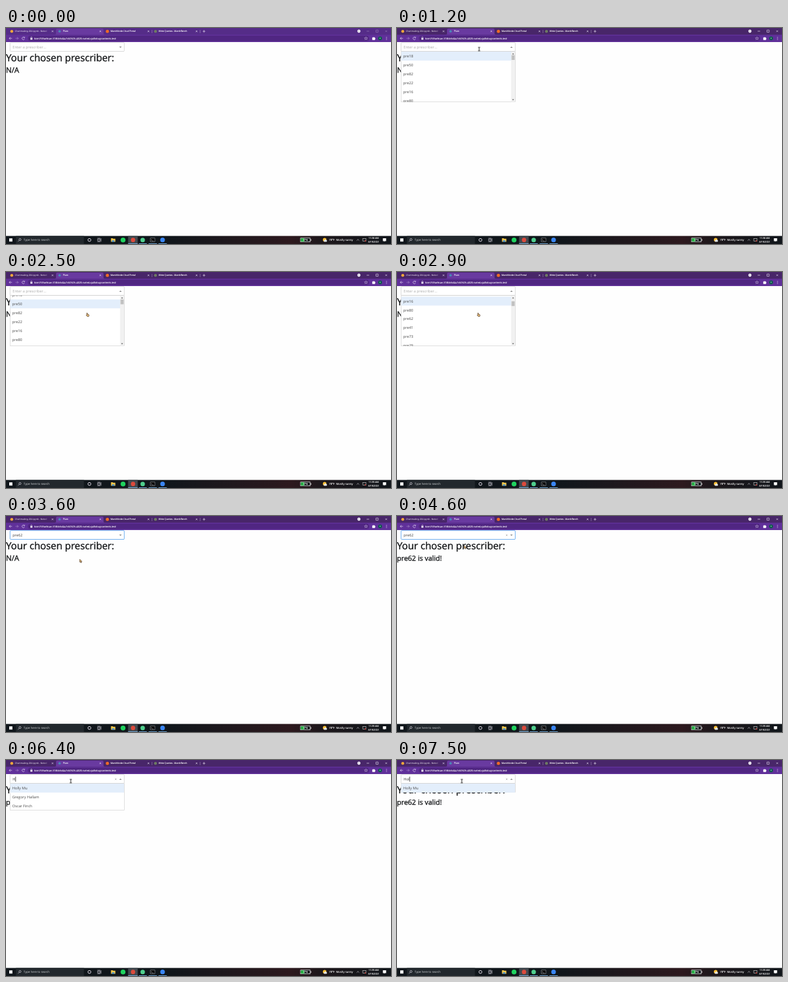
These frames come from a looping animation (600x338 px, 8000 ms). An HTML page:

```html
<!DOCTYPE html>
<html lang="en">
<head>
<meta charset="utf-8">
<title>Prescriber picker</title>
<style>
  html, body { margin: 0; width: 100%; height: 100%; overflow: hidden; background: #fefefe; }
  svg { display: block; width: 600px; height: 338px; }
  text { font-family: "Open Sans", "Noto Sans", sans-serif; text-rendering: geometricPrecision; white-space: pre; }
  .tab, .url, .tray { fill: #fff; stroke: #fff; stroke-width: .1; }
  .tab { font-size: 3.4px; }
  .url { font-size: 3.9px; }
  .line { fill: none; stroke: #f4eefa; stroke-width: .6; }
  .page { fill: #101214; stroke: #101214; stroke-width: .3; }
  .field { font-size: 5.75px; }
  .task { font-size: 4.45px; fill: #d6d9db; }
  .tray { font-size: 3.65px; }
</style>
</head>
<body>
<svg viewBox="0 0 600 338">
  <defs>
    <clipPath id="menuClip"><rect id="menuClipBox" x="6" y="37" width="178.5" height="79"/></clipPath>
    <linearGradient id="fade" gradientUnits="userSpaceOnUse" x1="60" x2="68.5">
      <stop stop-color="#fff"/><stop offset="1" stop-color="#fff" stop-opacity="0"/>
    </linearGradient>
    <linearGradient id="glass">
      <stop offset=".42" stop-color="#10161b"/><stop offset=".74" stop-color="#2d191e"/>
      <stop offset=".82" stop-color="#1d171b"/><stop offset="1" stop-color="#11161b"/>
    </linearGradient>
    <path id="cross" d="M-1.2-1.2 1.2 1.2M1.2-1.2-1.2 1.2"/>
  </defs>
  <rect width="600" height="338" fill="#fefefe"/>

  <!-- page -->
  <text class="page" id="heading" x="0" y="51.9" font-size="15.3">Your chosen prescriber:</text>
  <text class="page" id="result" x="0" y="70"></text>

  <!-- select -->
  <rect id="box" x="6.3" y="22.7" width="178" height="13.9" rx="1.2" fill="#fff" stroke-width=".75"/>
  <text class="field" id="value" x="10.3" y="32"></text>
  <path id="caret" d="M0 26V34" stroke="#111" stroke-width=".7"/>
  <use id="clear" href="#cross" x="171" y="30" stroke="#999" stroke-width=".6"/>
  <path id="arrow" fill="#888"/>
  <g id="menu">
    <rect id="menuBox" x="6.3" y="36.8" width="178" fill="#fff" stroke="#ccc" stroke-width=".6"/>
    <g clip-path="url(#menuClip)">
      <rect id="hover" x="6.6" width="177.4" height="13.9" fill="#e3eefb"/>
      <g id="rows" class="field" fill="#4a4a4a"></g>
    </g>
    <g id="bar">
      <rect x="177.8" y="37.2" width="6.2" height="78.4" fill="#f1f1f1"/>
      <rect id="thumb" x="178.5" width="4.9" height="7.4" fill="#c1c1c1"/>
      <path d="M179.4 41.2h3l-1.5-1.7zM179.4 111.6h3l-1.5 1.7z" fill="#555"/>
    </g>
  </g>

  <!-- browser -->
  <rect id="frame" width="600" height="22"/>
  <path d="M0 10.5H600V22H0Z" fill="#60309a"/>
  <path d="M76 10.5Q78 10.5 78 8.5V3Q78 1 80 1H150Q152 1 152 3V8.5Q152 10.5 154 10.5Z" fill="#693aa0"/>
  <rect x="34" y="12" width="532" height="8.4" rx="4.2" fill="#502682"/>
  <circle cx="9" cy="5.2" r="2.3" fill="#f0a63c"/>
  <circle cx="83.5" cy="5.2" r="1.9" fill="#4c86b8"/>
  <circle cx="158" cy="5.2" r="2.5" fill="#ee6a26"/>
  <circle cx="233" cy="5.2" r="2.3" fill="#6d7a62"/>
  <text class="tab" x="14" y="6.4" style="fill:url(#fade);stroke:none">Chartmaking-204.ipynb - Noted</text>
  <text class="tab" x="88.8" y="6.4">Plum</text>
  <text class="tab" x="163" y="6.4">MarshNode Cloud Portal</text>
  <text class="tab" x="237.8" y="6.4">Write Queries - MarshBench</text>
  <g class="line">
    <use href="#cross" x="72.5" y="5.2"/><use href="#cross" x="147" y="5.2"/>
    <use href="#cross" x="222" y="5.2"/><use href="#cross" x="297" y="5.2"/>
    <path d="M306.6 5.2h4M308.6 3.2v4"/>
    <path d="M227.5 3v5M302.5 3v5" opacity=".45"/>
    <g id="controls">
      <path d="M562 5h4M576.6 3.2h3.4v3.4h-3.4z"/>
      <use href="#cross" x="592.5" y="5"/>
    </g>
    <path d="M9.4 16.2H5M7 14.2l-2 2 2 2"/>
    <path d="M14.8 16.2h4.4M17.2 14.2l2 2-2 2" opacity=".5"/>
    <path d="M28.8 15a2.1 2.1 0 1 0 .2 2.1M29 13.7v1.6h-1.6"/>
    <path d="M38.6 15.8v-.8a1 1 0 0 1 2 0v.8"/>
    <path d="M561 13.8l.7 1.6 1.8.1-1.4 1.1.5 1.7-1.6-1-1.6 1 .5-1.7-1.4-1.1 1.8-.1z" stroke-width=".4"/>
  </g>
  <rect x="38" y="15.7" width="3.2" height="2.5" rx=".3" fill="#f4eefa"/>
  <text class="url" x="44" y="17.6">kvm7t3hw9cae-318bb5d4a7c60925-4020-noted.quillobaycontents.test</text>
  <circle cx="550" cy="5" r="2.4" fill="#fff"/>
  <path d="M549 4.5h2l-1 1.3z" fill="#4a2280"/>
  <path d="M570.8 14.8h1.3a.9.9 0 0 1 1.7 0h1.3v1.2a.9.9 0 0 1 0 1.7v1h-4.3z" fill="#fff"/>
  <circle cx="583" cy="16.2" r="3" fill="#0c5a4c"/>
  <text x="583" y="17.4" font-size="3.2" fill="#fff" text-anchor="middle">A</text>
  <g fill="#fff"><circle cx="593" cy="14.5" r=".5"/><circle cx="593" cy="16.2" r=".5"/><circle cx="593" cy="17.9" r=".5"/></g>

  <!-- taskbar -->
  <rect y="325.4" width="600" height="12.6" fill="url(#glass)"/>
  <rect x="15.5" y="325.4" width="106" height="12.6" fill="#22282d"/>
  <rect x="5" y="329.2" width="5" height="5" fill="#fff"/>
  <g class="line" stroke-width=".7">
    <circle cx="21.8" cy="331" r="1.6"/><path d="M20.6 332.2l-2 2"/>
    <circle cx="130" cy="331.7" r="2.3" stroke-width=".9"/>
    <path d="M142.8 330.4h4v2.6h-4zM142.4 329h4.6M142.4 334.4h4.6M148 329v5.4"/>
  </g>
  <text class="task" x="27.5" y="333.4">Type here to search</text>
  <rect x="190.3" y="325.4" width="15" height="12.6" fill="#41484e"/>
  <path d="M163.6 329h2.6l.7.8h3.5v4.8h-6.8z" fill="#f4c84c"/>
  <rect x="165" y="332.4" width="4" height="2.2" fill="#3f8fd4"/>
  <circle cx="182.4" cy="331.7" r="3.8" fill="#1fd25e"/>
  <circle cx="198" cy="331.7" r="3.4" fill="#dc4a3c"/>
  <circle cx="213" cy="331.7" r="3.5" fill="#4fcf8d"/>
  <rect x="225" y="328.8" width="7" height="5.6" fill="#050505" stroke="#b9bdc0" stroke-width=".5"/>
  <path d="M226.3 331l1 .8-1 .8M228 333h1.6" class="line" stroke-width=".4"/>
  <circle cx="244" cy="331.7" r="3.6" fill="#3a86f4"/>
  <path d="M190.3 337.5h15M207 337.5h12.5M222.3 337.5h13M237.6 337.5h13" stroke="#79b2e2" stroke-width=".9"/>
  <rect x="459" y="328.7" width="15" height="6" fill="#11181c" stroke="#fff" stroke-width=".7"/>
  <rect x="459.5" y="329.2" width="5.4" height="5" fill="#28b446"/>
  <rect x="474.5" y="330.4" width="1" height="2.6" fill="#fff"/>
  <text class="tray" x="466.6" y="333" text-anchor="middle">37%</text>
  <circle cx="496.6" cy="331.4" r="2.8" fill="#f9bf35"/>
  <path d="M496 334.4a1.3 1.3 0 0 1 .3-2.5 1.7 1.7 0 0 1 3 .2 1.2 1.2 0 0 1 .2 2.3z" fill="#dfe6ee"/>
  <text class="tray" x="503.3" y="333.3" style="font-size:4.25px">78°F  Mostly sunny</text>
  <path class="line" d="M546.6 332.6l1.9-1.8 1.9 1.8"/>
  <rect x="556" y="329.6" width="5" height="4" fill="none" stroke="#ddd" stroke-width=".6"/>
  <circle cx="560" cy="333.2" r="1" fill="#d8473e"/>
  <text class="tray" id="clock" x="573" y="330.4" text-anchor="middle"></text>
  <text class="tray" x="573" y="336.2" text-anchor="middle">8/15/2021</text>
  <path d="M587.4 329h5v4.4h-2l-1 1.2v-1.2h-2z" fill="#fff"/>

  <!-- pointers -->
  <g id="pointer">
    <path id="beam" d="M-1.6-2.8H-.5L0-2.4.5-2.8H1.6M0-2.4V2.4M-1.6 2.8H-.5L0 2.4.5 2.8H1.6" fill="none" stroke="#111" stroke-width=".9"/>
    <path id="hand" d="M-1.2-2.8q.7-.5 1 .3l.4 1.5 1.8.6q.6.3.4 1.2l-.4 1.8h-2.4l-1.5-1.9q-.2-.7.5-.6l.6.4z" fill="#e8bd7c" stroke="#3a2412" stroke-width=".6"/>
    <path id="tip" d="M-1.5-2.8V1.7l1.1-.9.8 1.8.9-.4-.8-1.7h1.5z" fill="#e8bd7c" stroke="#3a2412" stroke-width=".6"/>
  </g>
</svg>
<script>
  const LOOP = 8000, ROW = 13.9, TOP = 37, LEFT = 10.3;
  const ids = [...document.querySelectorAll('[id]')];
  const el = Object.fromEntries(ids.map(node => [node.id, node]));

  const codes = [18, 50, 82, 22, 16, 80, 62, 41, 73, 29, 55].map(n => 'pre' + n);
  const people = ['Holly Mu', 'Gregory Hallam', 'Oscar Finch'];

  // Each track lists [start time, value]; a value holds until the next start.
  const tracks = {
    active: [[0, false], [200, true]],
    open: [[0, false], [600, true], [3600, false], [5200, true]],
    focus: [[0, false], [500, true]],
    chosen: [[0, ''], [3600, 'pre62']],
    typed: [[0, ''], [6400, 'H'], [6900, 'Ho'], [7500, 'Hol']],
    caret: [[0, false], [600, true], [1200, false], [1600, true], [2100, false],
            [5200, true], [5400, false], [5900, true], [7400, false], [7500, true]],
    scroll: [[0, 0], [2500, 8], [2600, 31], [2800, 39], [2900, 54], [3000, 62], [5200, 17.4]],
    hover: [[0, 0], [2200, 1], [2600, 4], [3000, 6], [6400, 0]],
    clear: [[0, false], [3700, true]],
    result: [[0, 'N/A'], [4600, 'pre62 is valid!']],
    clock: [[0, '11:38 AM'], [1300, '11:39 AM']],
    shape: [[0, ''], [300, 'beam'], [2000, 'hand'], [3600, 'tip'], [5000, 'beam']],
    spot: [[0, [128, 33]], [2000, [128, 41]], [2100, [128, 51]], [2200, [127, 60]], [2300, [127, 67]],
           [3100, [121, 69]], [3200, [116.4, 70.6]], [4600, [106, 49]], [5000, [101, 33]]]
  };

  const at = (track, t) => track.findLast(([start]) => start <= t)[1];
  const set = (node, attrs) => { for (const key in attrs) node.setAttribute(key, attrs[key]); };
  const show = (node, on) => set(node, { visibility: on ? 'inherit' : 'hidden' });
  const write = (node, text) => { if (node.textContent !== text) node.textContent = text; };

  for (let i = 0; i < codes.length; i++) {
    const row = document.createElementNS('http://www.w3.org/2000/svg', 'text');
    row.setAttribute('x', 9.7);
    el.rows.append(row);
  }

  function drawMenu(s) {
    const items = s.typed ? people.slice(0, s.typed.length > 1 ? 1 : 3) : codes;
    const scroll = s.typed ? 0 : s.scroll;
    const height = Math.min(items.length * ROW, 78.8);
    const rowTop = i => TOP + i * ROW - scroll;
    set(el.menuBox, { height });
    set(el.menuClipBox, { height });
    set(el.hover, { y: rowTop(s.hover) });
    [...el.rows.children].forEach((row, i) => {
      const text = items[i] || '';
      write(row, text);
      set(row, { y: rowTop(i) + 9.05, 'font-weight': text === s.chosen ? 700 : 400 });
    });
    set(el.thumb, { y: 42.6 + scroll * .06 });
    show(el.bar, !s.typed);
  }

  function drawField(s) {
    write(el.value, s.typed || s.chosen || 'Enter a prescriber...');
    set(el.value, { fill: s.typed ? '#333' : !s.chosen ? '#aaa' : s.open ? '#777' : '#444' });
    set(el.box, { stroke: s.focus && !s.open ? '#3d93ea' : '#ccc' });
    set(el.arrow, { d: s.open ? 'M176.4 31h4l-2-2.1z' : 'M176.4 29h4l-2 2.1z' });
    show(el.clear, s.clear);
    const x = LEFT + .4 + (s.typed ? el.value.getComputedTextLength() : 0);
    set(el.caret, { transform: `translate(${x} 0)` });
    show(el.caret, s.open && s.caret);
  }

  function draw(t) {
    const s = {};
    for (const name in tracks) s[name] = at(tracks[name], t);
    set(el.frame, { fill: s.active ? '#482669' : '#552c88' });
    set(el.controls, { opacity: s.active ? 1 : .45 });
    drawField(s);
    drawMenu(s);
    show(el.menu, s.open);
    write(el.result, s.result);
    set(el.result, { 'font-size': s.result === 'N/A' ? 11.7 : 10.95 });
    write(el.clock, s.clock);
    set(el.pointer, { transform: `translate(${s.spot})` });
    for (const shape of ['beam', 'hand', 'tip']) show(el[shape], s.shape === shape);
  }

  const start = performance.now();
  function tick() {
    draw((performance.now() - start) % LOOP);
    requestAnimationFrame(tick);
  }
  tick();
</script>
</body>
</html>
```
